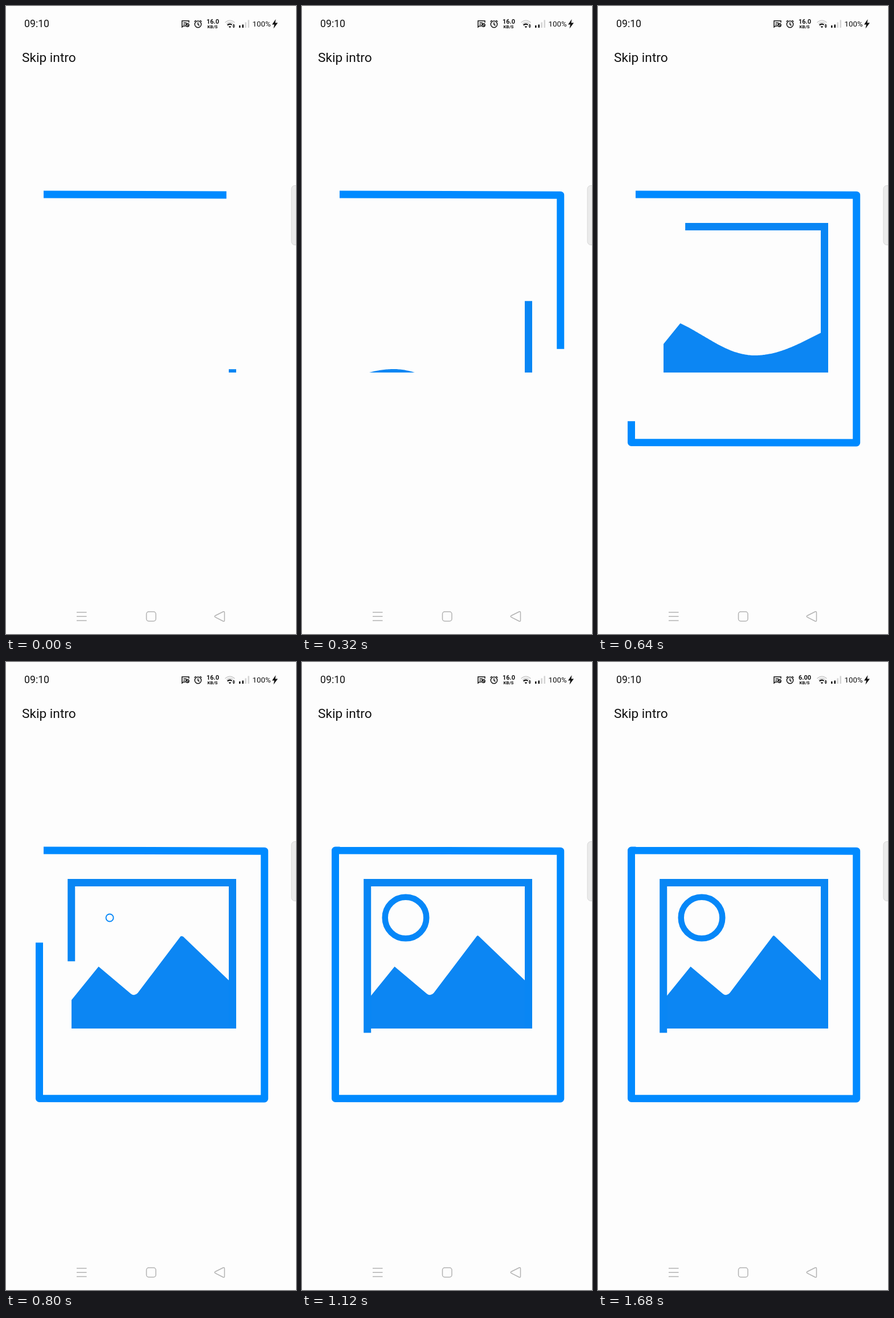
Recreate the animation shown at these times as an HTML page. Size 509 px wide and 1100 px high, loop 1760 ms.

```html
<!DOCTYPE html>
<html lang="en">
<head>
<meta charset="utf-8">
<title>Intro</title>
<style>
  html, body { margin: 0; width: 100%; height: 100%; overflow: hidden; background: #fdfdfd; }
  svg { display: block; width: 100%; height: 100%; font-family: Roboto, sans-serif; }
  .line { fill: none; stroke-width: 13; }
</style>
</head>
<body>
<svg viewBox="0 0 509 1100" fill="#111">
  <clipPath id="peaks">
    <path d="M115 642V592L162.500 533.500L219 581Q225 586 231 580L306.500 480.500Q308.500 478 311 481L404 570V642Z"/>
  </clipPath>

  <!-- status bar -->
  <text x="32" y="37" font-size="17.700">09:10</text>
  <g fill="none" stroke="#111" stroke-width="1.500">
    <path d="M321 29V26H309V37L311.500 35H315M311.500 29.500H317M311.500 32.500H314"/>
    <circle cx="318.500" cy="33.500" r="2.700"/>
    <path d="M317 32L320 35"/>
    <circle cx="337" cy="32" r="5.700"/>
    <path d="M337 28.500V32.500L339.500 34M330.500 27.500L333.500 25M343.500 27.500L340.500 25"/>
    <path d="M384.500 29Q393 21.500 401.500 29M387 31.500Q393 26 399 31" stroke="#ccc"/>
    <path d="M388.500 33.500Q393 30 396.500 33" stroke-width="2"/>
  </g>
  <path d="M390.500 35.500H395.500L393 38.500ZM397.500 34.500L399.700 31.500L402 34.500ZM397.500 35.500H402L399.700 38.500Z"/>
  <path d="M409 34H411.500V38H409ZM414.500 32.500H417V38H414.500Z"/>
  <path d="M419.500 28.500H422V38H419.500ZM424.500 24.500H427V38H424.500Z" fill="#d4d4d4"/>
  <g font-weight="700" text-anchor="middle">
    <text id="rate" x="363" y="31" font-size="11">16.0</text>
    <text x="362.500" y="39" font-size="8">KB/S</text>
  </g>
  <text x="432.500" y="36" font-size="13.300">100%</text>
  <path d="M473.500 23L467 32.500H471L469.500 39.500L477 29.500H472.500Z"/>

  <text x="28" y="97.500" font-size="22.700">Skip intro</text>

  <!-- edge handle -->
  <rect x="501" y="314.500" width="20" height="104" rx="6" fill="#ebebeb" stroke="#d6d6d6"/>

  <!-- picture icon -->
  <path id="wave" clip-path="url(#peaks)" fill="#0c86f3"/>
  <path id="inner" class="line" stroke="#0986f4" d="M397.500 642V386.500H114.700V649.500"/>
  <path id="outer" class="line" stroke="#008aff" stroke-linejoin="round" d="M66 330L453.700 331.200V765L58.500 764.500V330H66.500"/>
  <circle id="sun" r="36.300" fill="none" stroke="#0687f8" stroke-width="10.500"/>

  <!-- navigation bar -->
  <g fill="none" stroke="#b2b2b2" stroke-width="1.500" stroke-linejoin="round">
    <path d="M124 1062H141.500M124 1069.300H141.500M124 1076.500H141.500"/>
    <rect x="246.500" y="1061" width="16.500" height="16.500" rx="4"/>
    <path d="M367 1068Q365.500 1069 367 1070.300L381 1077.500Q383.500 1078.500 383.500 1076V1062.500Q383.500 1060 381 1061Z"/>
  </g>
</svg>
<script>
const LOOP = 1760, STEP = 80;
const $ = id => document.getElementById(id);
const clamp = p => Math.min(1, Math.max(0, p));
const ease = p => (p = clamp(p), p * p * (3 - 2 * p));

// time, crest x, crest y, amplitude
const waveKeys = [
  [160, 50, 665, 25],
  [320, 161, 636, 30],
  [480, 295, 594, 40],
  [640, 485, 544, 34],
  [800, 690, 480, 30],
  [960, 890, 410, 0]
];

function waveAt(t) {
  const i = Math.max(1, waveKeys.findIndex(k => k[0] >= t));
  const [a, b] = t >= 960 ? waveKeys.slice(-2) : [waveKeys[i - 1], waveKeys[i]];
  const p = clamp((t - a[0]) / (b[0] - a[0]));
  return a.map((v, j) => v + (b[j] - v) * p);
}

// Skewed swell: long rise on the left of a crest, shorter fall on its right
function wavePath(t) {
  const [, crestX, crestY, amp] = waveAt(t);
  const rise = 210, fall = 180, length = rise + fall;
  let d = "M112 660";
  for (let x = 112; x <= 406; x += 2) {
    const u = ((x - crestX + rise) % length + length) % length - rise;
    const y = crestY + amp * (1 - Math.cos(Math.PI * u / (u < 0 ? rise : fall)));
    d += `L${x} ${y.toFixed(1)}`;
  }
  return d + "L406 660Z";
}

function trim(path, p) {
  const length = path.getTotalLength();
  path.setAttribute("stroke-dasharray", p < 1 ? `${length * p} ${length * 2}` : "none");
}

function draw(now) {
  const time = Math.floor((now + 2) % LOOP / STEP) * STEP;
  const t = Math.max(time, 128); // the opening pose is held briefly
  trim($("outer"), ease((t + 236) / 1292));
  trim($("inner"), ease((t - 80) / 960));
  $("wave").setAttribute("d", wavePath(t));
  $("sun").setAttribute("transform", `translate(182 448) scale(${ease((t - 711) / 329)})`);
  $("rate").textContent = time < 1600 ? "16.0" : "6.00";
  requestAnimationFrame(draw);
}
requestAnimationFrame(draw);
</script>
</body>
</html>
```
